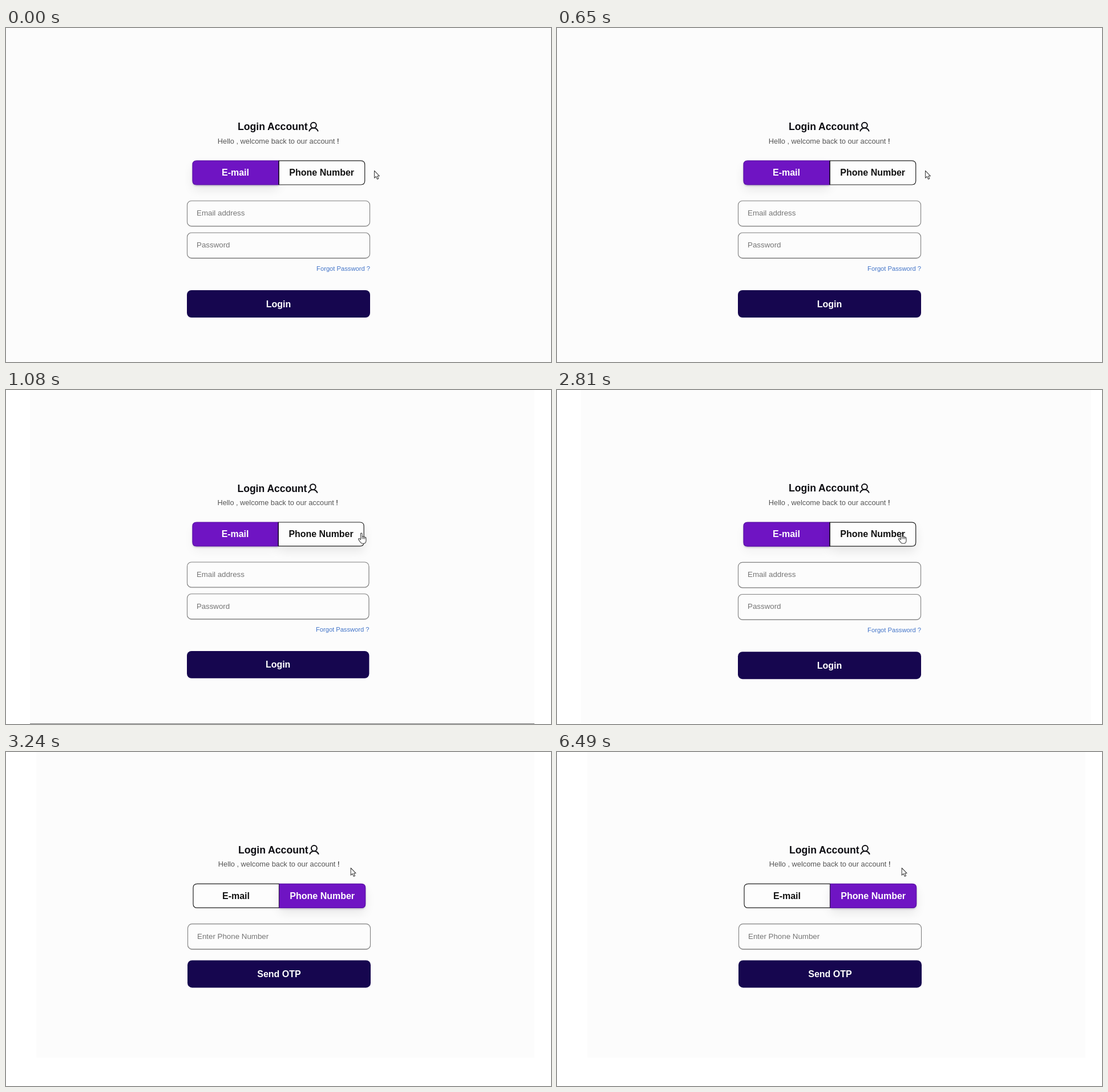
An HTML page that plays this animation: 955x586 px, repeating every 8650 ms.

```html
<!DOCTYPE html>
<html lang="en">
<head>
<meta charset="utf-8">
<title>Login form</title>
<style>
  html, body { margin: 0; width: 100%; height: 100%; overflow: hidden; background: #fff; }
  svg { display: block; width: 955px; height: 586px; font-family: "Liberation Sans", Arial, sans-serif; }
  .bold { font-weight: 700; font-size: 16px; }
  .title { font-weight: 700; font-size: 17.6px; fill: #0d0d12; }
  .hello { font-size: 12.8px; fill: #555; }
  .hint { font-size: 13.33px; fill: #757575; }
  .link { font-size: 11.2px; fill: #4274c8; }
  .mid { text-anchor: middle; }
</style>
</head>
<body>
<svg id="stage" viewBox="0 0 955 586" xmlns="http://www.w3.org/2000/svg">
  <defs>
    <filter id="soft" x="-30%" y="-100%" width="160%" height="300%"><feGaussianBlur stdDeviation="9"/></filter>
    <filter id="near" x="-10%" y="-30%" width="120%" height="160%"><feGaussianBlur stdDeviation="1.5"/></filter>
    <g id="arrow" stroke="#444" stroke-width="1.1" stroke-linejoin="round" fill="#fff">
      <path d="M.5 .5V13.2L3.4 10.5L5.6 15.2L7.8 14.2L5.7 9.7H9.3Z"/>
    </g>
    <g id="hand" stroke="#444" stroke-width="1.1" stroke-linejoin="round" stroke-linecap="round" fill="#fff">
      <path d="M4.4 12V2C4.4 .2 7 .2 7 2V7.2C7.4 5.9 9.4 6 9.5 7.5C10 6.5 11.7 6.8 11.8 8.2C12.6 7.4 14 7.9 14 9.4V13.2C14 16.4 12.4 18.8 9.4 18.8H7.6C5.4 18.8 4.4 17.6 3.3 15.8L.8 11.9C.1 10.5 1.6 9.4 2.8 10.4Z"/>
      <path d="M7 7.2V10.5M9.5 7.5V10.5M11.8 8.2V10.8" fill="none"/>
    </g>
  </defs>
</svg>
<script>
const LOOP = 8650;
const PAPER = '#fcfcfc';

// page: [x, width, height]; move: transform of the form; cursor: [shape, x, y]
const scenes = [
  { at: 0, page: [0, 955, 586], move: '', cursor: ['arrow', 645, 250] },
  { at: 1080, page: [42, 884, 586], line: true, hover: true,
    move: 'translate(317 172.4) scale(.995) translate(-317 -173)', cursor: ['hand', 617, 250.5] },
  { at: 2160, page: [42, 894, 584], hover: true, move: 'translate(0 -.8)', cursor: ['hand', 598, 250.5] },
  { at: 3240, page: [53, 873, 536], phone: true, move: 'translate(1 -1.6)', cursor: ['arrow', 603.7, 203] }
];

const rect = (x, y, w, h, rest) => `<rect x="${x}" y="${y}" width="${w}" height="${h}" ${rest}/>`;
const text = (x, y, cls, str, rest = '') => `<text x="${x}" y="${y}" class="${cls}" ${rest}>${str}</text>`;

const shadow = (x, alpha) => rect(x, 241, 151, 43, `rx="7" fill="#000" opacity="${alpha}" filter="url(#soft)"`);

function tab(x, label, active, left) {
  const a = x + .5, b = x + 151, t = 232.9, e = 275;
  const d = left
    ? `M${b} ${t}H${a + 7}Q${a} ${t} ${a} ${t + 7}V${e - 7}Q${a} ${e} ${a + 7} ${e}H${b}Z`
    : `M${a} ${t}H${b - 7}Q${b} ${t} ${b} ${t + 7}V${e - 7}Q${b} ${e} ${b - 7} ${e}H${a}Z`;
  const glow = active ? `<path d="${d}" transform="translate(0 2)" fill="#402060" opacity=".28" filter="url(#near)"/>` : '';
  const fill = active ? '#6f14c3' : '#fdfdfd';
  const edge = active ? '#5a10a6' : '#222';
  return glow + `<path d="${d}" fill="${fill}" stroke="${edge}" stroke-width="1.2"/>` +
    text(x + 75.5, 259.3, 'bold mid', label, `fill="${active ? '#fff' : '#111'}"`);
}

const field = (y, hint) =>
  rect(317.5, y + 1, 320, 44, 'rx="7.5" fill="none" stroke="#bbb" stroke-width="1"') +
  rect(317.5, y, 320, 44.3, `rx="7.5" fill="${PAPER}" stroke="#808080" stroke-width="1.1"`) +
  text(334, y + 26, 'hint', hint);

const button = (y, label) =>
  rect(317, y, 321, 48, 'rx="8" fill="#16064f"') +
  text(477.5, y + 29.6, 'bold mid', label, 'fill="#fff"');

const header =
  text(406, 179.2, 'title', 'Login Account') +
  `<g fill="none" stroke="#0d0d12" stroke-width="2">
    <circle cx="538.9" cy="170.6" r="4.9"/>
    <path d="M531 181.3C532.3 177.6 535.3 175.5 538.9 175.5S545.5 177.6 546.9 181.3"/></g>` +
  text(370.8, 203, 'hello', 'Hello , welcome back to our account <tspan fill="#111">!</tspan>');

function tabs(s) {
  const mail = tab(326.5, 'E-mail', !s.phone, true);
  const phone = tab(477.7, 'Phone Number', s.phone, false);
  if (s.phone) return mail + shadow(478, .08) + phone;
  return shadow(327, s.hover ? .045 : .08) + mail + (s.hover ? shadow(478, .085) : '') + phone +
    '<path d="M477.9 233V275" stroke="#1c0b30" stroke-width="1.2"/>';
}

const body = s => s.phone
  ? field(303.2, 'Enter Phone Number') + button(367, 'Send OTP')
  : field(303.2, 'Email address') + field(359.3, 'Password') +
    text(638, 425.6, 'link', 'Forgot Password ?', 'text-anchor="end"') + button(460, 'Login');

function draw(s) {
  const [x, w, h] = s.page, [shape, cx, cy] = s.cursor;
  return `<g class="scene">` + rect(0, 0, 955, 586, 'fill="#fff"') +
    rect(x, 0, w, h, `fill="${PAPER}"`) +
    (s.line ? rect(x, 585, w, 1, 'fill="#777"') : '') +
    `<g transform="${s.move}">${header}${tabs(s)}${body(s)}</g>` +
    `<use href="#${shape}" x="${cx}" y="${cy}"/></g>`;
}

const stage = document.getElementById('stage');
stage.insertAdjacentHTML('beforeend', scenes.map(draw).join(''));
const groups = [...stage.querySelectorAll('.scene')];

function show(now) {
  const t = now % LOOP;
  const current = scenes.findLastIndex(s => s.at <= t);
  groups.forEach((g, i) => g.style.display = i === current ? '' : 'none');
}

function tick() {
  show(performance.now() - start);
  requestAnimationFrame(tick);
}

const start = performance.now();
tick();
</script>
</body>
</html>
```
